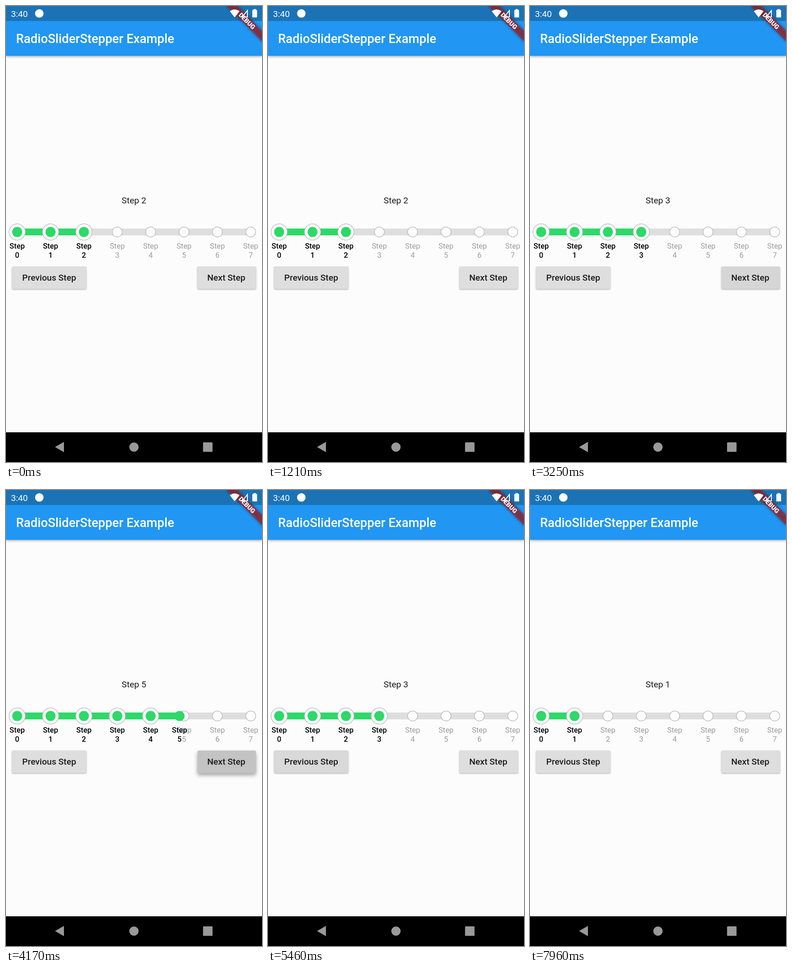
An HTML page that plays this animation: 561 by 998 pixels, repeating every 8000 ms.

```html
<!DOCTYPE html>
<html lang="en">
<head>
<meta charset="utf-8">
<title>RadioSliderStepper Example</title>
<style>
  html, body { margin: 0; width: 100%; height: 100%; overflow: hidden; background: #fcfcfc; }
  svg { display: block; width: 561px; height: 998px; font-family: Roboto, sans-serif; }
  .mid { text-anchor: middle; }
  .body { font-size: 19.1px; fill: #1c1c1c; }
  .strong { font-weight: 500; }
  .label { font-size: 16.37px; text-anchor: middle; }
  .off { fill: #9c9c9c; }
  .on { fill: #000; font-weight: 500; }
</style>
</head>
<body>
<svg id="stage" viewBox="0 0 561 998">
  <rect width="561" height="998" fill="#fcfcfc"/>
  <rect y="32" width="561" height="77" fill="#2196f3" style="filter:drop-shadow(0 2px 2.5px rgba(0,0,0,.32))"/>
  <rect width="561" height="32.7" fill="#1b73b6"/>
  <text x="22" y="81.4" font-size="27.3" class="strong" fill="#fff">RadioSliderStepper Example</text>

  <text id="title" x="280.3" y="432" class="body mid"></text>
  <rect x="24.5" y="487" width="512" height="15" fill="#dedede"/>
  <g id="idle"></g>
  <rect id="fill" x="24.5" y="487" height="15" fill="#2dd968"/>
  <g id="done"></g>
  <g id="head"></g>

  <rect id="prev" x="13.3" y="570.3" width="162.7" height="49.2" rx="2.7"/>
  <text x="94.6" y="601.4" class="body strong mid">Previous Step</text>
  <rect id="next" x="419.5" y="570.3" width="128.3" height="49.2" rx="2.7"/>
  <text x="482.7" y="601.4" class="body strong mid">Next Step</text>

  <g transform="translate(561 0) rotate(45)">
    <rect x="-56" y="38.2" width="112" height="16.4" fill="#000" opacity=".4" style="filter:blur(3px)"/>
    <rect x="-56" y="38.2" width="112" height="16.4" fill="#b71c1c" opacity=".63"/>
    <text y="51.3" font-size="13.9" font-weight="900" class="mid" fill="#fff">DEBUG</text>
  </g>

  <g fill="#fff">
    <text x="11" y="24" font-size="19.1">3:40</text>
    <circle cx="73" cy="16.3" r="9.3"/>
    <path d="M490.5 11.5Q501 3.5 511.7 11.5L501 25Z"/>
    <path d="M529 10V24H518Z" fill="none" stroke="#fff" stroke-width="2"/>
    <path d="M542.5 8.5V6.8H547.5V8.5H549.2Q550.2 8.5 550.2 9.5V24Q550.2 25 549.2 25H540.8Q539.8 25 539.8 24V9.5Q539.8 8.5 540.8 8.5Z"/>
  </g>

  <rect y="933" width="561" height="65"/>
  <g fill="#999">
    <path d="M107.5 965.2L127 954V976.5Z"/>
    <circle cx="280.4" cy="965.4" r="10.2"/>
    <rect x="431.8" y="955" width="20.8" height="20.8" rx="1.5"/>
  </g>
</svg>
<script>
const LOOP = 8000, START = 2, COUNT = 8, SLIDE = 150;
const TAPS = [
  [3000, 1], [3540, 1], [4076, 1],
  [4805, -1], [5190, -1], [5575, -1], [5960, -1]
];
const $ = id => document.getElementById(id);
const clamp = v => Math.max(0, Math.min(1, v));
const mix = (a, b, k) => a + (b - a) * k;
const stepX = i => 24.5 + 73.12 * i;
const show = (el, on) => el.setAttribute('visibility', on ? 'visible' : 'hidden');

function add(parent, tag, attrs, text) {
  const el = document.createElementNS('http://www.w3.org/2000/svg', tag);
  for (const key in attrs) el.setAttribute(key, attrs[key]);
  if (text !== undefined) el.textContent = text;
  parent.append(el);
  return el;
}

const dot = (g, r, fill, stroke = 'none') =>
  add(g, 'circle', { cy: 494.6, r, fill, stroke, 'stroke-width': 1.3 });

function label(g, kind, i) {
  add(g, 'text', { class: 'label ' + kind, y: 531.3 }, 'Step');
  return add(g, 'text', { class: 'label ' + kind, y: 550.5 }, i);
}

function marker(parent, i, active) {
  const g = add(parent, 'g', { transform: `translate(${stepX(i)} 0)` });
  if (active) {
    dot(g, 17.8, '#fdfdfd', '#b9b9b9');
    dot(g, 11, '#2dd968');
  } else {
    dot(g, 11, '#fdfdfd', '#b9b9b9');
  }
  label(g, active ? 'on' : 'off', i);
  return g;
}

const steps = [...Array(COUNT).keys()];
const idle = steps.map(i => marker($('idle'), i, false));
const done = steps.map(i => marker($('done'), i, true));
dot($('head'), 11, '#2dd968');
const headNumber = label($('head'), 'on', START);

// Press strength: quick rise before release, short hold, then fade.
const press = (dt, hold, end) => clamp((dt + 100) / 100) * (1 - clamp((dt - hold) / (end - hold)));

function paintButton(el, dir, t) {
  let ink = 0, lift = 0;
  for (const [at, d] of TAPS) {
    if (d !== dir) continue;
    ink = Math.max(ink, press(t - at, 100, 310));
    lift = Math.max(lift, press(t - at, 95, 230));
  }
  const c = Math.round(mix(222, 195, ink));
  el.setAttribute('fill', `rgb(${c},${c},${c})`);
  el.style.filter = `drop-shadow(0 ${mix(1.8, 5, lift)}px ${mix(1.4, 4.5, lift)}px rgba(0,0,0,.34))`;
}

function render(t) {
  let current = START, pos = START;
  for (const [at, d] of TAPS) {
    if (t < at) break;
    const u = clamp((t - at) / SLIDE);
    pos = current + d * (1 - (1 - u) ** 2);
    current += d;
  }
  $('title').textContent = 'Step ' + current;
  $('fill').setAttribute('width', stepX(pos) - stepX(0));
  steps.forEach(i => {
    show(idle[i], i > pos);
    show(done[i], i <= pos);
  });
  show($('head'), pos !== current);
  $('head').setAttribute('transform', `translate(${stepX(pos)} 0)`);
  headNumber.textContent = current;
  paintButton($('prev'), -1, t);
  paintButton($('next'), 1, t);
}

const begin = performance.now();
function tick() {
  render((performance.now() - begin) % LOOP);
  requestAnimationFrame(tick);
}
tick();
</script>
</body>
</html>
```
